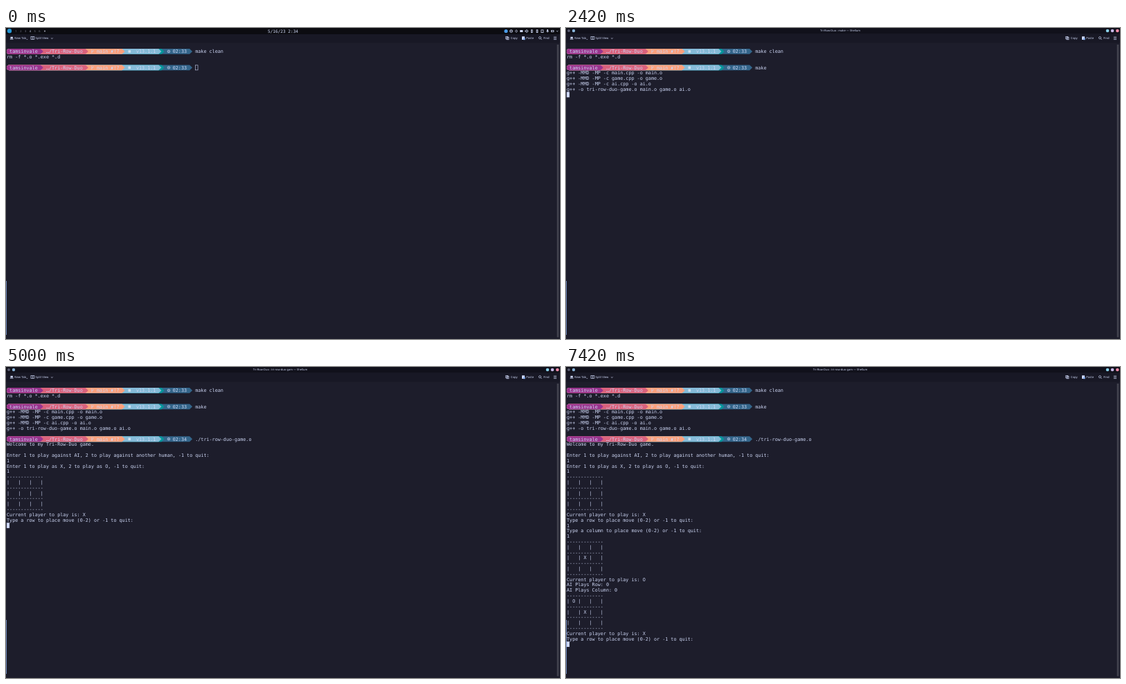
Write an HTML page with a canvas that moves like this. It is 800 px wide and 450 px high and loops after 8000 ms.

```html
<!DOCTYPE html>
<html lang="en">
<head>
<meta charset="utf-8">
<title>Terminal game</title>
<style>
html, body { margin: 0; width: 100%; height: 100%; overflow: hidden; background: #1d1d2b; }
canvas { display: block; }
</style>
</head>
<body>
<canvas id="stage" width="800" height="450"></canvas>
<script>
const ctx = document.getElementById('stage').getContext('2d');
const CELL_W = 4.0625, CELL_H = 7.8125, LEFT = 1, TOP = 30;
const FPS = 12, LOOP = 8000;
const INK = '#cdd6f4', BASE = '#1d1d2b';
const MONO = '"DejaVu Sans Mono", monospace', SANS = '"Noto Sans", sans-serif';
const GAME = 'tri-row-duo-game.o';

const RULE = '-'.repeat(13) + '\n';
const board = cells => [0, 3, 6].map(i =>
  RULE + '| ' + [...cells.slice(i, i + 3)].join(' | ') + ' |\n').join('') + RULE;
const compile = name => `g++ -MMD -MP -c ${name}.cpp -o ${name}.o\n`;
const turn = 'Current player to play is: ';
const ask = what => `Type a ${what} to place move (0-2) or -1 to quit:\n`;

// Terminal output as [tick, text]; "$hh:mm" at a line start is a prompt.
const output = [
  [0, '$02:33make clean\nrm -f *.o *.exe *.d\n\n$02:33'],
  [14, 'm'], [15, 'a'], [16, 'k'], [17, 'e'],
  [18, '\n' + compile('main')],
  [21, compile('game')],
  [26, compile('ai')],
  [29, `g++ -o ${GAME} main.o game.o ai.o\n`],
  [31, '\n$02:34'],
  [35, './'], [37, 't'], [39, GAME[1]],
  [41, GAME.slice(2) + ' '],
  [44, '\nWelcome to my Tri-Row-Duo game.\n\n' +
    'Enter 1 to play against AI, 2 to play against another human, -1 to quit:\n'],
  [53, '1'],
  [54, '\nEnter 1 to play as X, 2 to play as O, -1 to quit:\n'],
  [57, '1'],
  [60, '\n' + board('         ') + turn + 'X\n' + ask('row')],
  [72, '1'],
  [76, '\n' + ask('column')],
  [79, '1'],
  [81, '\n' + board('    X    ') + turn + 'O\nAI Plays Row: 0\nAI Plays Column: 0\n' +
    board('O   X    ') + turn + 'X\n' + ask('row')]
];

const colX = c => LEFT + c * CELL_W;
const rowY = r => TOP + r * CELL_H;

function rect(x, y, w, h, color) {
  ctx.fillStyle = color;
  ctx.fillRect(x, y, w, h);
}

function dot(x, y, r, color) {
  ctx.fillStyle = color;
  ctx.beginPath();
  ctx.arc(x, y, r, 0, 7);
  ctx.fill();
}

function ring(x, y, r, color = INK) {
  ctx.strokeStyle = color;
  ctx.beginPath();
  ctx.arc(x, y, r, 0, 7);
  ctx.stroke();
}

function line(color, ...points) {
  ctx.strokeStyle = color;
  ctx.beginPath();
  points.forEach(([x, y]) => ctx.lineTo(x, y));
  ctx.stroke();
}

function box(x, y, w, h, color = INK) {
  ctx.strokeStyle = color;
  ctx.strokeRect(x, y, w, h);
}

function label(text, x, y, font, color = INK, align = 'left') {
  ctx.font = font;
  ctx.fillStyle = color;
  ctx.textAlign = align;
  ctx.fillText(text, x, y);
}

const cells = (text, col, row) =>
  label(text, colX(col), rowY(row) + 6.2, '6.75px ' + MONO);

const segments = [['#33658a', 65], ['#06969a', 55], ['#86bbd8', 54],
  ['#fca17d', 41], ['#da627d', 28], ['#9a348e', 12]];

function prompt(row, time) {
  const y = rowY(row), mid = y + CELL_H / 2;
  for (const [color, end] of segments) {
    ctx.fillStyle = color;
    ctx.beginPath();
    ctx.moveTo(colX(1), y);
    ctx.lineTo(colX(end), y);
    ctx.lineTo(colX(end + 1), mid);
    ctx.lineTo(colX(end), y + CELL_H);
    ctx.lineTo(colX(1), y + CELL_H);
    ctx.ellipse(colX(1), mid, CELL_W, CELL_H / 2, 0, Math.PI / 2, Math.PI * 1.5);
    ctx.fill();
  }
  cells('tamsinvale', 1, row);
  cells('…/Tri-Row-Duo', 14, row);
  cells('main ✘!?', 32, row);
  cells('v13.1.1', 46, row);
  cells(time, 59, row);
  ctx.lineWidth = 0.7;
  line(INK, [123.8, mid - 2.5], [123.8, mid + 2.5]);
  line(INK, [123.8, mid + 1], [126, mid - 0.5], [126, mid - 2]);
  rect(176.5, mid - 1.8, 3.6, 3.6, '#cfe0f0');
  ring(235, mid, 1.8);
  dot(235, mid, 0.7, INK);
}

function terminal(tick) {
  const lines = output.filter(([at]) => at <= tick).map(([, text]) => text).join('').split('\n');
  let col = 0;
  lines.forEach((text, row) => {
    const isPrompt = text[0] === '$';
    if (isPrompt) prompt(row, text.slice(1, 6));
    const typed = isPrompt ? text.slice(6) : text;
    const start = isPrompt ? 67 : 0;
    cells(typed, start, row);
    col = start + typed.length;
  });
  const x = colX(col), y = rowY(lines.length - 1);
  ctx.lineWidth = 0.6;
  if (tick < 2) box(x + 0.4, y + 0.4, CELL_W - 0.6, CELL_H - 0.8);
  else rect(x, y, CELL_W, CELL_H, INK);
}

function titleBar(tick) {
  rect(0, 0, 800, 8.5, '#11111b');
  const job = tick < 26 ? 'bash' : tick < 54 ? 'make' : GAME.slice(0, 15);
  label(`Tri-Row-Duo : ${job} — Shellum`, 396, 5.4, '4px ' + SANS, INK, 'center');
  dot(4, 4, 2, '#585b70');
  dot(11, 4, 2.2, '#89b4d8');
  dot(782, 4, 2.3, '#89cfe8');
  dot(789, 4, 2.3, '#c5b8e8');
  dot(796.3, 4, 2.3, '#f38ba8');
}

function toolBar() {
  const font = '4.2px ' + SANS;
  rect(0, 8.5, 800, 13, '#181825');
  ctx.lineWidth = 0.7;
  rect(6.5, 12.8, 3.4, 2.4, INK);
  rect(5.8, 15.6, 4.8, 1, INK);
  label('New Tab', 12.3, 16.4, font);
  line(INK, [29.6, 16], [30.4, 16.8], [31.2, 16]);
  box(36, 12.4, 4.8, 4.2);
  line(INK, [38.4, 12.4], [38.4, 16.6]);
  label('Split View', 42.6, 16.4, font);
  line(INK, [65, 14.3], [66.4, 15.6], [67.8, 14.3]);
  box(721.8, 12.4, 3, 3.4);
  box(723, 13.4, 3, 3.4);
  label('Copy', 728.8, 16.4, font);
  rect(745, 12.2, 4, 4.8, INK);
  rect(747, 14.4, 2.6, 2.8, '#89b4fa');
  label('Paste', 751.3, 16.4, font);
  ring(771, 14.2, 1.6);
  line(INK, [772.2, 15.4], [773.8, 17]);
  label('Find', 776.2, 16.4, font);
  for (const y of [13, 14.8, 16.6]) line(INK, [790.8, y], [795, y]);
}

function panel(shift) {
  ctx.save();
  ctx.translate(0, -shift);
  rect(0, 0, 800, 9, '#0c0c11');
  dot(5, 4.3, 3.2, '#2596d4');
  for (let i = 0; i < 6; i++)
    label(i + 1, 14.5 + i * 6.8, 5.8, '4px ' + SANS, i === 3 ? INK : '#777b8c', 'center');
  dot(56, 4.4, 1, '#a5a9b8');
  label('5/16/23 2:34', 400, 6.8, '6.1px ' + MONO, INK, 'center');
  ctx.lineWidth = 0.8;
  dot(722, 4.5, 2.6, '#4a9be8');
  ring(729.5, 4.5, 2);
  line(INK, [727.8, 4.3], [731.2, 4.3]);
  line(INK, [737, 2.7], [738.6, 4.5], [737, 6.3], [735.4, 4.5], [737, 2.7]);
  rect(742.2, 3, 4.2, 3, INK);
  rect(749.3, 3.6, 1.4, 1.8, INK);
  line(INK, [750.6, 3.6], [752.2, 2.4], [752.2, 6.6], [750.6, 5.4]);
  line(INK, [753.5, 3.2], [754, 4.5], [753.5, 5.8]);
  for (const x of [759.3, 767]) {
    rect(x - 1.3, 2.3, 2.6, 4.6, INK);
    line('#0c0c11', [x, 3.2], [x, 6]);
  }
  box(772.9, 2.8, 3, 3.8);
  rect(781.2, 2, 1.7, 3.2, INK);
  line(INK, [780.3, 4.5], [782, 6.2], [783.8, 4.5]);
  box(787.5, 3.4, 3.4, 2.2);
  line(INK, [795, 4], [796.2, 5.2], [797.4, 4]);
  ctx.restore();
}

function draw(now) {
  const tick = Math.floor((now % LOOP) * FPS / 1000 + 0.01);
  ctx.textRendering = 'geometricPrecision';
  rect(0, 0, 800, 450, BASE);
  titleBar(tick);
  toolBar();
  rect(795.6, 24, 2.6, 423.5, '#42434f');
  rect(0, 366, 1, 78, '#7089bd');
  terminal(tick);

  // The desktop panel slides up off the window.
  const p = Math.min(1, Math.max(0, (tick - 1) / 8));
  if (p < 1) panel(9 * p * p * (3 - 2 * p));
}

const begin = performance.now();
function frame() {
  draw(performance.now() - begin);
  requestAnimationFrame(frame);
}
frame();
</script>
</body>
</html>
```
